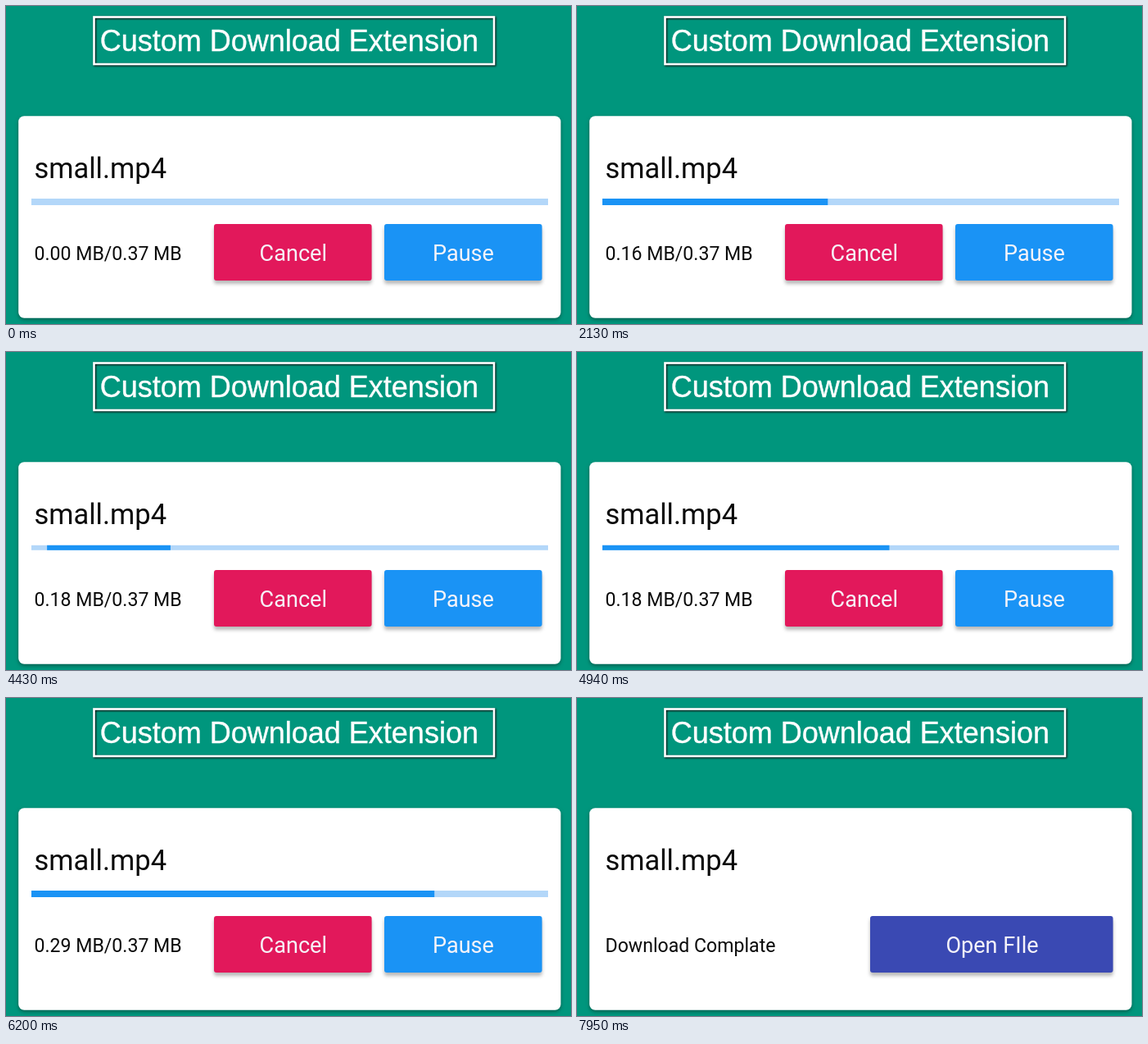
Animation of 690x388 px, one loop 8760 ms. Source, as an HTML page:

```html
<!DOCTYPE html>
<html lang="en">
<head>
<meta charset="utf-8">
<title>Custom Download Extension</title>
<style>
  html, body { margin: 0; width: 100%; height: 100%; overflow: hidden; background: #00967d; }
  svg { display: block; width: 690px; height: 388px; font-family: Roboto, sans-serif; }
  .frame { fill: none; stroke: #fff; stroke-width: 2.6; filter: drop-shadow(1.5px 1.5px .8px #000); }
  .title { font: 36px "Liberation Sans", Arial, sans-serif; fill: #fff; stroke: #fff; stroke-width: .4; }
  .card { fill: #fff; filter: drop-shadow(0 2px 2px rgba(0, 50, 40, .55)); }
  .name { font-size: 34.5px; fill: #0a0a0a; }
  .status { font-size: 23.1px; fill: #0a0a0a; }
  .button rect { filter: drop-shadow(0 4px 2px rgba(0, 0, 0, .28)); }
  .button text { font-size: 27.1px; fill: #f6f3f9; text-anchor: middle; }
  .fill { fill: #1a93f5; }
</style>
</head>
<body>
<svg viewBox="0 0 690 388">
  <rect class="frame" x="107.5" y="13.5" width="488.5" height="57.5"/>
  <text class="title" x="114.7" y="55">Custom Download Extension</text>
  <rect class="card" x="15.2" y="134.2" width="662.3" height="246.6" rx="7"/>
  <text class="name" x="34.4" y="210">small.mp4</text>
  <text class="status" id="status" x="34.5" y="309.5"></text>
  <g id="loading">
    <g id="bar">
      <rect x="31" width="631" fill="#b3d7f9"/>
      <rect class="fill" id="lead"/>
      <rect class="fill" id="follow"/>
    </g>
    <g class="button">
      <rect x="254" y="266" width="192.6" height="69" rx="3" fill="#e2185b"/>
      <text x="350.8" y="311">Cancel</text>
    </g>
    <g class="button">
      <rect x="462" y="266" width="192.6" height="69" rx="3" fill="#1a93f5"/>
      <text id="toggle" x="558.5" y="311"></text>
    </g>
  </g>
  <g class="button" id="done">
    <rect x="358" y="266" width="296.6" height="69" rx="3" fill="#3a49b3"/>
    <text x="507" y="311">Open FIle</text>
  </g>
</svg>
<script>
  const LOOP = 8760, SIZE_MB = 0.366;
  const PAUSED = 2280, RESUMED = 4250, CONNECTED = 5030, COMPLETE = 7430;
  const SWEEP_START = 4285, SWEEP_TIME = 970;
  const BAR_X = 31, BAR_W = 631;
  // [time in ms, downloaded share]
  const PROGRESS = [[30, 0], [1290, .263], [PAUSED, .467], [2890, .467], [2960, .48],
    [CONNECTED, .48], [6200, .78], [6950, .78], [7400, 1], [LOOP, 1]];
  const $ = id => document.getElementById(id);
  const clamp = v => Math.min(1, Math.max(0, v));

  function progressAt(t) {
    const i = PROGRESS.findIndex(([time]) => t <= time);
    if (i < 1) return 0;
    const [t0, p0] = PROGRESS[i - 1], [t1, p1] = PROGRESS[i];
    return p0 + (p1 - p0) * (t - t0) / (t1 - t0);
  }

  // Easing along joined cubic curves: x0,y0 then three points per curve
  function spline(...p) {
    return x => {
      let i = 0;
      while (i + 8 < p.length - 2 && x > p[i + 6]) i += 6;
      const at = (s, k) => (1 - s) ** 3 * p[i + k] + 3 * (1 - s) ** 2 * s * p[i + 2 + k]
        + 3 * (1 - s) * s * s * p[i + 4 + k] + s ** 3 * p[i + 6 + k];
      let lo = 0, hi = 1;
      for (let n = 0; n < 24; n++) {
        const mid = (lo + hi) / 2;
        if (at(mid, 0) < x) lo = mid; else hi = mid;
      }
      return at(lo, 1);
    };
  }

  // Material indeterminate bar, in units of its 360-wide view
  const leadMove = spline(0, 0, .0375, 0, .1288, .0895, .25, .2186,
    .3225, .2854, .4368, .4174, .4833, .4898, .69, .8097, .7933, .95, 1, 1);
  const leadGrow = spline(0, 0, .0683, .0199, .1922, .1586, .3333, .3493,
    .3841, .4148, .5495, .6814, .6667, .6828, .7526, .6818, .7373, .8789, 1, 1);
  const followMove = spline(.2, 0, .3958, 0, .4748, .2068, .5917, .4171,
    .7152, .6394, .8163, .9746, 1, 1);
  const followGrow = spline(.3665, 0, .4725, .0624, .6154, .5, .6833, .5,
    .7548, .5, .7573, .8145, 1, 1);

  function sweep(el, q, from, distance, move, grow, peak) {
    const center = (180 + from + distance * move(q)) / 360;
    const scale = peak - (peak - .1) * Math.abs(1 - 2 * grow(q));
    segment(el, center - .4 * scale, center + .4 * scale);
  }

  function segment(el, from, to) {
    const a = clamp(from), b = clamp(to);
    el.setAttribute('x', BAR_X + a * BAR_W);
    el.setAttribute('width', (b - a) * BAR_W);
  }

  function draw(t) {
    const progress = progressAt(t);
    const complete = t >= COMPLETE;
    const waiting = t >= RESUMED && t < CONNECTED;
    $('loading').style.display = complete ? 'none' : '';
    $('done').style.display = complete ? '' : 'none';
    $('status').textContent = complete ? 'Download Complate'
      : `${(progress * SIZE_MB).toFixed(2)} MB/0.37 MB`;
    $('toggle').textContent = t >= PAUSED && t < RESUMED ? 'Resume' : 'Pause';

    for (const el of $('bar').children) {
      el.setAttribute('y', waiting ? 235.8 : 235);
      el.setAttribute('height', waiting ? 6 : 8);
    }
    if (waiting) {
      const q = clamp((t - SWEEP_START) / SWEEP_TIME);
      sweep($('lead'), q, -197.6, 620.2, leadMove, leadGrow, .91);
      sweep($('follow'), q, -522.6, 722.2, followMove, followGrow, .827);
    } else {
      segment($('lead'), 0, progress);
      segment($('follow'), 0, 0);
    }
  }

  const begin = performance.now();
  function tick() {
    draw((performance.now() - begin) % LOOP);
    requestAnimationFrame(tick);
  }
  tick();
</script>
</body>
</html>
```
